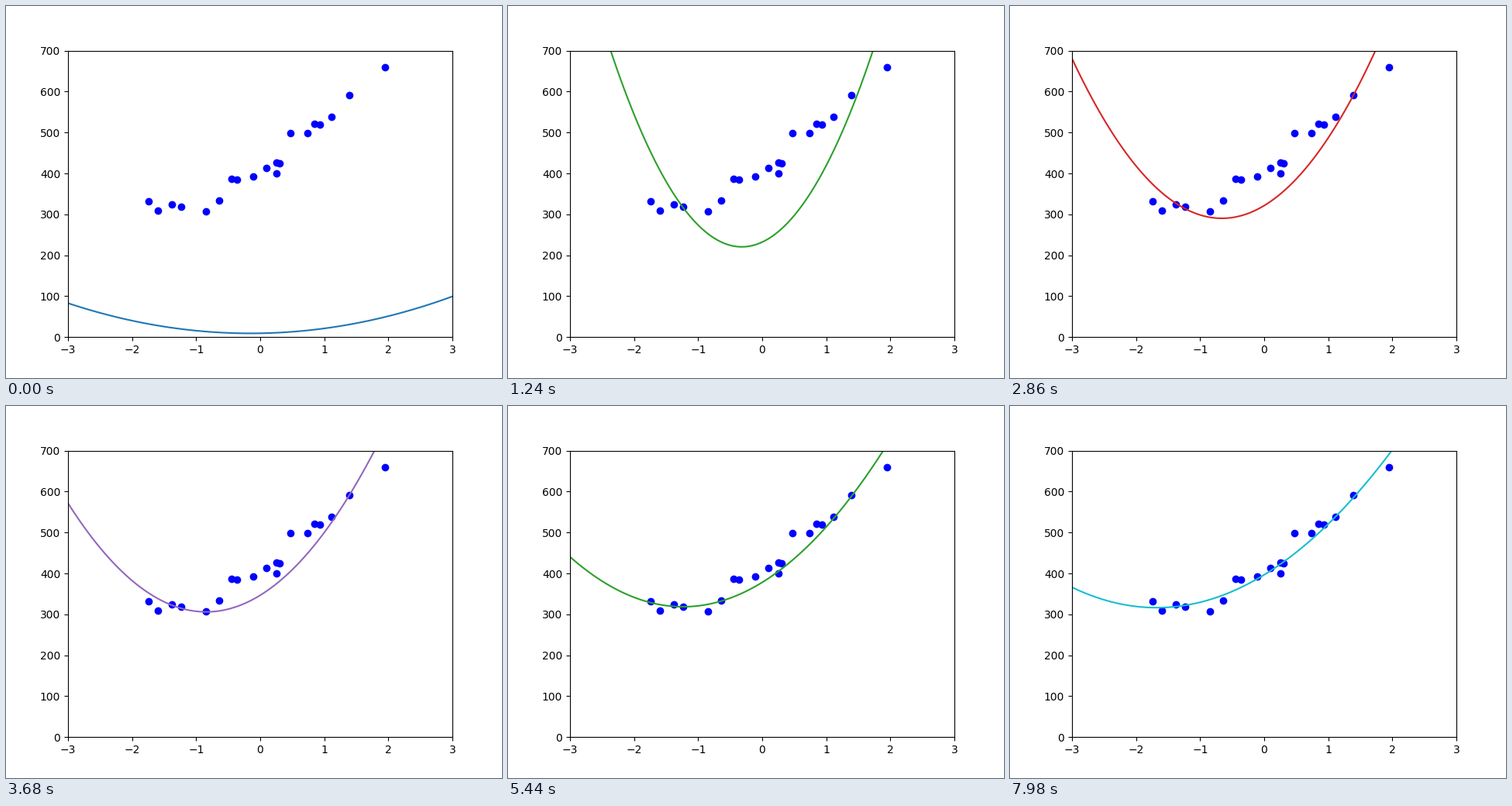
These frames come from a looping animation (640 by 480 pixels, 8 s). A matplotlib script:

```python
import numpy as np
import matplotlib.pyplot as plt
from matplotlib.animation import FuncAnimation

STEPS = 400
ETA = 1e-3

clicks = np.array([
    (235, 591), (216, 539), (148, 413), (35, 310), (85, 308),
    (204, 519), (49, 325), (25, 332), (173, 498), (191, 498),
    (134, 392), (99, 334), (117, 385), (112, 387), (162, 425),
    (272, 659), (159, 427), (159, 400), (59, 319), (198, 522),
], dtype=float)
x, y = clicks.T
x = (x - x.mean()) / x.std()


def design(v):
    return np.vstack([np.ones_like(v), v, v ** 2]).T


def descend(theta):
    """Return the parameters after each gradient descent step."""
    X = design(x)
    path = []
    for _ in range(STEPS):
        theta = theta - ETA * X.T @ (X @ theta - y)
        path.append(theta)
    return path


path = descend(np.array([0.75, 0.9, 0.11]))
grid = np.linspace(-3, 3, 100)
basis = design(grid)

fig, ax = plt.subplots(figsize=(6.4, 4.8), dpi=100)
ax.plot(x, y, "bo")
curve, = ax.plot(grid, basis @ path[0], color="C0")
ax.set_xlim(-3, 3)
ax.set_ylim(0, 700)


def update(i):
    curve.set_ydata(basis @ path[i])
    curve.set_color(f"C{i % 10}")
    return curve,


anim = FuncAnimation(fig, update, frames=STEPS, interval=20,
                     repeat=True, repeat_delay=0)
plt.show()
```
